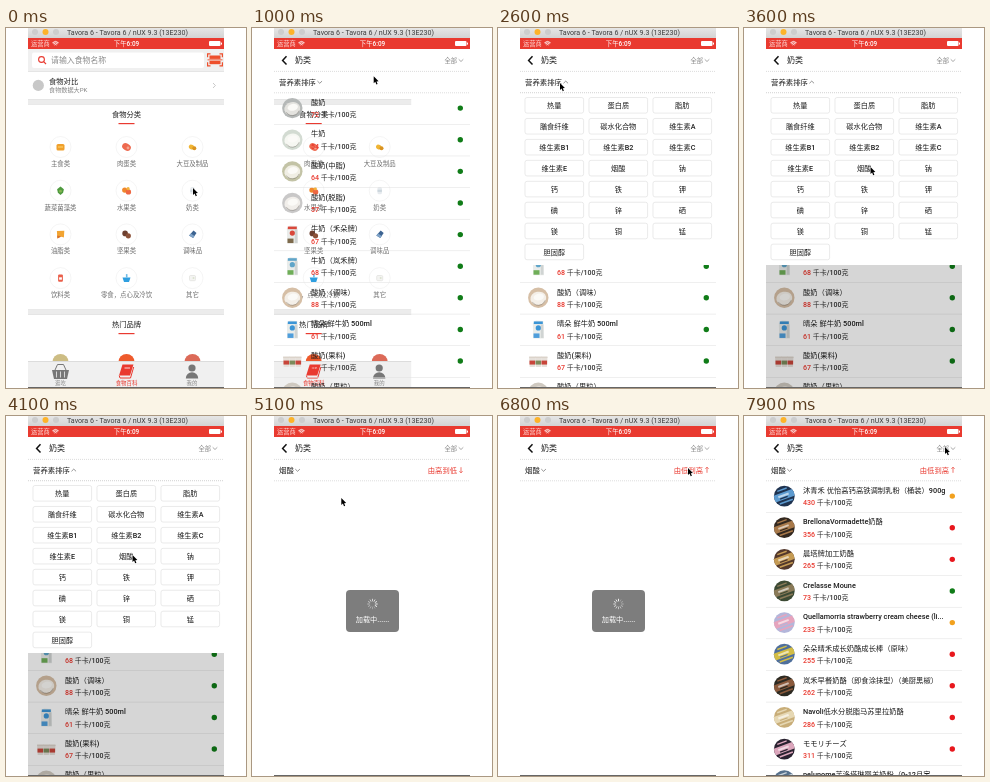
An HTML page with a canvas that plays this animation: 240 px wide and 360 px high, repeating every 8000 ms.

```html
<!DOCTYPE html>
<html lang="zh">
<head>
<meta charset="utf-8">
<style>
html,body{margin:0;width:100%;height:100%;overflow:hidden;background:#fff}
canvas{display:block;width:240px;height:360px}
</style>
</head>
<body>
<canvas id="stage"></canvas>
<script>
const LOOP = 8000, STEP = 100, L = 22, R = 218, W = R - L;
const RED = '#e93a30', INK = '#1c1c1c', GREY = '#858585';
const FONT = 'Roboto,"Noto Sans CJK SC","Noto Sans CJK",sans-serif';
const cv = document.getElementById('stage'), c = cv.getContext('2d');
const ratio = window.devicePixelRatio || 1;
cv.width = 240 * ratio;
cv.height = 360 * ratio;

const clamp = v => Math.max(0, Math.min(1, v));
const ease = v => v * v * (3 - 2 * v);
const easeOut = v => 1 - Math.pow(1 - v, 3);

function rect(x, y, w, h, fill) { c.fillStyle = fill; c.fillRect(x, y, w, h); }
function oval(x, y, rx, ry, fill, turn = 0) {
  c.beginPath(); c.ellipse(x, y, rx, ry, turn, 0, 7); c.fillStyle = fill; c.fill();
}
function disc(x, y, r, fill) { oval(x, y, r, r, fill); }
function round(x, y, w, h, r, fill, stroke, lw = 0.6) {
  c.beginPath(); c.roundRect(x, y, w, h, r);
  if (fill) { c.fillStyle = fill; c.fill(); }
  if (stroke) { c.strokeStyle = stroke; c.lineWidth = lw; c.stroke(); }
}
function line(pts, color, lw = 0.8) {
  c.beginPath();
  for (let i = 0; i < pts.length; i += 2) c.lineTo(pts[i], pts[i + 1]);
  c.strokeStyle = color; c.lineWidth = lw; c.stroke();
}
function poly(pts, fill) {
  c.beginPath();
  for (let i = 0; i < pts.length; i += 2) c.lineTo(pts[i], pts[i + 1]);
  c.closePath(); c.fillStyle = fill; c.fill();
}
function text(s, x, y, size, color = INK, align = 'left', weight = 500) {
  c.font = `${weight} ${size}px ${FONT}`;
  c.textAlign = align; c.textBaseline = 'alphabetic'; c.fillStyle = color;
  c.fillText(s, x, y + size * 0.37);
  return c.measureText(s).width;
}
function arc(x, y, r, a, b, color, lw) {
  c.beginPath(); c.arc(x, y, r, a, b); c.strokeStyle = color; c.lineWidth = lw; c.stroke();
}
function chevron(x, y, up, color) {
  const d = up ? -1 : 1;
  line([x - 2.3, y - d * 1.1, x, y + d * 1.1, x + 2.3, y - d * 1.1], color, 0.7);
}
function dotted(y) {
  c.setLineDash([1, 1]); line([L, y, R, y], '#cfcfcf', 0.7); c.setLineDash([]);
}

function chrome() {
  const g = c.createLinearGradient(0, 0, 0, 10);
  g.addColorStop(0, '#e6e6e6'); g.addColorStop(1, '#d3d3d3');
  rect(L, 0, W, 10, g);
  disc(29, 4, 3, '#cdcdcd'); disc(39.5, 4, 3, '#fdb32a'); disc(50, 4, 3, '#cdcdcd');
  text('Tavora 6 - Tavora 6 / nUX 9.3 (13E230)', 121.5, 4.4, 7.1, '#3c3c3c', 'center', 400);
  rect(L, 10, W, 11, RED);
  text('运营商', 25, 15.5, 6.3, '#ffe2df', 'left', 400);
  for (const r of [1.6, 3.2, 4.6]) arc(49.5, 18.2, r, -2.3, -0.84, '#fff', 0.9);
  text('下午6:09', 120.5, 15.5, 6.4, '#fff', 'center');
  round(203, 13, 11.5, 5, 1, '#fff'); rect(215, 14.6, 1, 2, '#fff');
}

// Small category pictures, each centred on 0,0
const icons = [
  () => { round(-4, -3, 8, 6.5, 1.5, '#f0a02c'); rect(-2.5, -1, 5, 2, '#f7bc4d'); },
  () => { oval(0, 0, 4.6, 3.4, '#ee6a50', 0.5); disc(1.5, 1, 1.4, '#f4a58e'); },
  () => { oval(-1, 0, 2.8, 2.3, '#f0b534', 0.6); disc(1.8, 1.2, 2, '#d99321'); },
  () => { poly([0, -4.2, 3.4, -1.5, 2.6, 2, 0, 4.2, -2.6, 2, -3.4, -1.5], '#4e9a3f'); disc(0, 0.5, 1.4, '#86b653'); },
  () => { disc(-1.8, -0.6, 2.6, '#f0872c'); disc(1.9, 1.2, 2.7, '#ee6742'); disc(1.6, -2, 1.6, '#f3b23c'); },
  () => { round(-2.2, -3.6, 4.4, 7.2, 1.5, '#e6eaee'); rect(-2.2, -1, 4.4, 2.2, '#ccd6dd'); },
  () => { poly([-3.6, -3.4, 3.8, -3.6, 3.4, 3, 0, 2, -3.2, 4], '#f2a431'); poly([-3.4, 1, 1, 2, -3, 4], '#d9702b'); },
  () => { disc(-1.4, -1, 2.8, '#6d4030'); disc(1.8, 1.4, 2.6, '#8c5138'); },
  () => { poly([-3.4, 1, 1, -4, 4, -1.4, 0.6, 3.6], '#3c6391'); poly([-3.4, 1, -1.6, -1, 2, 1.6, 0.6, 3.6], '#7fa3c8'); },
  () => { round(-2.4, -3.6, 4.8, 7.2, 1, '#ea5f4a'); rect(-1.4, -0.8, 2.8, 2.4, '#fff'); },
  () => { poly([-4, -0.5, 4, -0.5, 2.5, 4, -2.5, 4], '#2f9fe0'); rect(-0.6, -4, 1.6, 3.5, '#6fbbe6'); },
  () => { round(-3, -2.6, 6, 5.2, 1, '#f4f4f2', '#dcdcd8'); disc(1, 0, 1, '#dbe2d0'); }
];
const kinds = ['主食类', '肉蛋类', '大豆及制品', '蔬菜菌藻类', '水果类', '奶类',
  '油脂类', '坚果类', '调味品', '饮料类', '零食，点心及冷饮', '其它'];

function heading(s, y) {
  text(s, 120.5, y, 7.3, INK, 'center');
  rect(112.5, y + 8.7, 16, 1.2, RED);
}
function band(y) {
  rect(L, y, W, 5.5, '#ececec');
  rect(L, y, W, 0.5, '#dcdcdc'); rect(L, y + 5, W, 0.5, '#dcdcdc');
}

function home() {
  rect(L, 21, W, 339, '#fff');
  rect(L, 21, W, 22.5, '#f0f0f0');
  round(26, 24.5, 172, 15.5, 2, '#fff');
  arc(35.5, 31.5, 2.9, 0, 7, RED, 1.1); line([37.6, 33.6, 40, 36], RED, 1.2);
  text('请输入食物名称', 45, 32, 7.9, '#8c8c8c', 'left', 400);
  for (const d of [-1, 1]) for (const e of [-1, 1])
    line([209 + d * 4.5, 31.8 + e * 6, 209 + d * 7.4, 31.8 + e * 6, 209 + d * 7.4, 31.8 + e * 2.5], '#ee4f2c', 1.2);
  rect(203.5, 27.5, 11, 3.4, '#ee4f2c'); rect(203.5, 32.8, 11, 3.4, '#ee4f2c');
  rect(201.5, 31.4, 15, 0.9, '#ee4f2c');
  rect(L, 43, W, 0.6, '#dadada');

  disc(32.3, 57.4, 5.6, '#c8c8c8');
  text('食物对比', 43, 53, 7.3);
  text('食物数据大PK', 43, 62, 6.15, GREY, 'left', 400);
  line([207, 55, 209.4, 57.5, 207, 60], '#bbb');
  band(71);
  heading('食物分类', 86.3);
  kinds.forEach((name, i) => {
    const x = 54.5 + 66 * (i % 3), y = 119 + 43.7 * Math.floor(i / 3);
    arc(x, y, 10.5, 0, 7, '#efefef', 0.6);
    c.save(); c.translate(x, y); icons[i](); c.restore();
    text(name, x, y + 16.5, 6.4, '#6c6c6c', 'center', 400);
  });
  band(281.5);
  heading('热门品牌', 296.3);
  ['#cdbd84', '#ee5a2c', '#dc6a58'].forEach((col, i) => disc(54.5 + i * 66, 334, 8, col));

  rect(L, 333, W, 27, '#f0f0f0'); rect(L, 333, W, 0.6, '#cfcfcf');
  poly([46, 342, 63, 342, 61, 351, 48, 351], '#777');
  line([49, 342, 51.5, 336.5, 57.5, 336.5, 60, 342], '#777', 1);
  for (const x of [50.5, 54.5, 58.5]) rect(x - 0.4, 343.5, 0.8, 6, '#f0f0f0');
  poly([116.5, 336.5, 127.5, 336.5, 124, 347.5, 113, 347.5], RED);
  line([113.2, 347.6, 114, 350, 124.5, 350, 127.7, 339], RED, 1);
  line([118.5, 340, 124, 340], '#fff', 0.8);
  disc(186, 340, 3.6, '#777');
  c.beginPath(); c.arc(186, 350.5, 6.2, Math.PI, 0); c.fillStyle = '#777'; c.fill();
  text('逛吃', 54.5, 355, 5.4, GREY, 'center', 400);
  text('食物百科', 120.5, 355, 5.4, RED, 'center');
  text('我的', 186, 355, 5.4, GREY, 'center', 400);
}

// name, energy, dot, two picture colours, picture form
const G = '#107c18', O = '#f2a11e', D = '#e8171d';
const dairy = [
  ['酸奶', 72, G, '#b5b8b7', '#e4e3df', 'bowl'],
  ['牛奶', 54, G, '#d3dbd2', '#f6f7f2', 'bowl'],
  ['酸奶(中脂)', 64, G, '#c3c3a6', '#f0eee4', 'bowl'],
  ['酸奶(脱脂)', 57, G, '#c9c8c8', '#f1eeea', 'bowl'],
  ['牛奶（禾朵牌）', 67, G, '#d9483b', '#7d6a4c', 'box'],
  ['牛奶（岚禾牌）', 68, G, '#5fa5c9', '#6fae58', 'box'],
  ['酸奶（调味）', 88, G, '#d6bfa6', '#f4efe8', 'bowl'],
  ['晴朵 鲜牛奶 500ml', 61, G, '#3b95d6', '#4f9edb', 'box'],
  ['酸奶(果料)', 67, G, '#7c8a5a', '#c8453a', 'cups'],
  ['酸奶（果粒）', 97, G, '#cfc9c0', '#f4f0ea', 'bowl']
];
const niacin = [
  ['沐青禾 优怡高钙高铁调制乳粉（桶装）900g', 430, O, '#1f3350', '#5d9bd0'],
  ['BrellonaVormadette奶酪', 356, D, '#33281f', '#a8794a'],
  ['晨塔牌加工奶酪', 265, D, '#53382c', '#c59b54'],
  ['Crelasse Moune', 73, G, '#3c4a34', '#8a7a58'],
  ['Quellamorria strawberry cream cheese (li...', 233, O, '#b3b6da', '#e6a4bd'],
  ['朵朵晴禾成长奶酪成长棒（原味）', 255, D, '#4f6f9c', '#d3bd45'],
  ['岚禾早餐奶酪（即食涂抹型）（美厨黑椒）', 262, D, '#2d2a22', '#8b5a3c'],
  ['Navoli低水分脱脂马苏里拉奶酪', 286, D, '#c8ad78', '#e6d8b4'],
  ['モモリチーズ', 311, D, '#2a2230', '#dca6bc'],
  ['pelunome芙洛塔琳婴羊奶粉（0-12月宝…', 480, O, '#55708c', '#c8d2da']
];

const forms = {
  bowl(a, b) {
    disc(0, 0, 10.2, a);
    oval(0, 0.5, 8, 6.6, b, -0.2);
    oval(0.5, -0.8, 5.2, 3.4, '#fbfaf7', -0.2);
    arc(0, 0.5, 7, 0.3, 2.6, 'rgba(90,85,75,.35)', 1);
  },
  box(a, b) {
    poly([-5.5, -6, -2.5, -9, 5, -8.5, 5.5, 9, -5, 9], '#e9ecea');
    rect(-4.5, -8, 9, 2.6, a); disc(0, -1.5, 2.6, a);
    rect(-4.8, 4, 6, 4.5, b); rect(2.5, -5, 2.8, 13.5, 'rgba(120,130,130,.22)');
  },
  cups(a, b) {
    for (const d of [-6, 0, 6]) {
      poly([d - 3.2, -4, d + 3.2, -4, d + 2.6, 6, d - 2.6, 6], '#e6e0da');
      rect(d - 2.8, -0.5, 5.6, 4, d ? b : a); rect(d - 3.2, -4.5, 6.4, 1.2, '#d8cfc6');
    }
  },
  pack(a, b) {
    disc(0, 0, 10.4, a);
    c.beginPath(); c.arc(0, 0, 10.4, 0, 7); c.clip();
    c.rotate(-0.35);
    rect(-11, -4, 22, 7, b);
    rect(-6, -2, 11, 2, 'rgba(255,255,255,.6)');
    rect(-5, 0.8, 8, 1.2, a); rect(-7, 5, 14, 1.6, b); rect(-5, -7.5, 10, 1.4, b);
  }
};

function rows(list) {
  list.forEach(([name, kcal, dot, a, b, form = 'pack'], i) => {
    const y = 64.8 + 31.62 * i;
    c.save(); c.translate(40.3, y + 15.3); forms[form](a, b); c.restore();
    text(name, 59, y + 9.3, 7.3);
    const w = text(kcal, 59, y + 21.8, 7.1, RED);
    text(' 千卡/100克', 59 + w, y + 21.8, 7, '#2a2a2a');
    disc(208.3, y + 15.3, 2.7, dot);
    rect(L, y + 31.3, W, 0.5, '#dedede');
  });
}

function header(label, order, up) {
  rect(L, 21, W, 44, '#fff');
  line([34.5, 28.3, 30.6, 32.4, 34.5, 36.5], '#111', 1.5);
  text('奶类', 43, 32.2, 8);
  text('全部', 192.5, 32.2, 6.3, GREY, 'left', 400);
  chevron(209, 32.4, false, GREY);
  dotted(43.4);
  const w = text(label, 27, 54, 7.4);
  chevron(27 + w + 3.8, 54.2, up, '#666');
  if (order) {
    text(order, 205, 54, 7.3, RED, 'right');
    const d = order.endsWith('低') ? 1 : -1;
    line([209, 51.2, 209, 56.8], RED, 0.7);
    line([207.4, 54 + d * 1.2, 209, 54 + d * 2.8, 210.6, 54 + d * 1.2], RED, 0.7);
  }
  dotted(64.8);
}

const nutrients = ('热量 蛋白质 脂肪 膳食纤维 碳水化合物 维生素A 维生素B1 维生素B2 维生素C ' +
  '维生素E 烟酸 钠 钙 铁 钾 碘 锌 硒 镁 铜 锰 胆固醇').split(' ');

function panel(dim) {
  rect(L, 65, W, 295, `rgba(0,0,0,${0.16 * dim})`);
  rect(L, 65, W, 172, '#fff');
  dotted(64.8);
  nutrients.forEach((n, i) => {
    const x = 56.3 + 64 * (i % 3), y = 77.3 + 20.95 * Math.floor(i / 3);
    round(x - 29.3, y - 7.8, 58.6, 15.6, 2, '#fff', '#dcdcdc');
    text(n, x, y, 7.2, INK, 'center');
  });
}

function hud(t) {
  round(94, 174, 53, 42, 4, '#7d7d7d');
  const head = Math.floor(t / 83);
  for (let i = 0; i < 12; i++) {
    const a = i * Math.PI / 6, k = ((head - i) % 12 + 12) % 12;
    const x = Math.cos(a), y = Math.sin(a);
    line([120.5 + 2.7 * x, 188 + 2.7 * y, 120.5 + 5.2 * x, 188 + 5.2 * y], `rgba(255,255,255,${1 - k * 0.065})`, 0.9);
  }
  text('加载中......', 120.5, 203, 7.2, '#fff', 'center');
}

// time, x, y of the pointer tip
const path = [
  [0, 187, 160], [300, 187, 160], [1000, 121.7, 48.2], [1300, 121.7, 48.2], [2200, 62, 55],
  [2700, 62, 55], [3500, 126.5, 139], [4200, 126.5, 139], [4900, 89.3, 82],
  [5300, 89.3, 82], [6300, 190, 52], [6900, 190, 52], [7700, 201, 31], [8000, 201, 31]
];
function pointer(t) {
  const i = path.findIndex(p => p[0] > t), p = path[i - 1], q = path[i];
  const k = ease((t - p[0]) / (q[0] - p[0]));
  c.save();
  c.translate(p[1] + (q[1] - p[1]) * k, p[2] + (q[2] - p[2]) * k);
  c.beginPath();
  [[0, 0], [0, 7], [1.6, 5.6], [2.7, 8.2], [3.9, 7.7], [2.8, 5.2], [4.9, 5]].forEach(v => c.lineTo(...v));
  c.closePath();
  c.strokeStyle = '#fff'; c.lineWidth = 1; c.stroke();
  c.fillStyle = '#000'; c.fill();
  c.restore();
}

function draw(t) {
  c.setTransform(ratio, 0, 0, ratio, 0, 0);
  rect(0, 0, 240, 360, '#fff');
  c.save();
  c.beginPath(); c.rect(L, 0, W, 360); c.clip();
  const push = easeOut(clamp((t - 300) / 600));
  if (t < 1100) {
    c.save(); c.translate(-0.3 * W * push, 0); home(); c.restore();
  }
  c.save();
  c.translate(W * (1 - push), 0);
  const sorted = t >= 4300, rising = t >= 6500, open = t >= 2550 && !sorted;
  if (push > 0) {
    if (!sorted) { if (t >= 800) rows(dairy); }
    else if (t >= 7300) rows(niacin);
    else if (t >= 5500 && !rising) rows([...niacin].reverse());
    header(sorted ? '烟酸' : '营养素排序', sorted && (rising ? '由低到高' : '由高到低'), open);
    if (open) panel(clamp((t - 2600) / 300));
  }
  c.restore();
  if ((t >= 4300 && t < 5500) || (rising && t < 7300)) hud(t);
  rect(L, 359, W, 1, '#666');
  chrome();
  c.restore();
  pointer(t);
}

const start = performance.now();
function tick(now) {
  const t = Math.max(0, now - start) % LOOP;
  draw(Math.floor(t / STEP) * STEP);
  requestAnimationFrame(tick);
}
draw(0);
requestAnimationFrame(tick);
</script>
</body>
</html>
```
